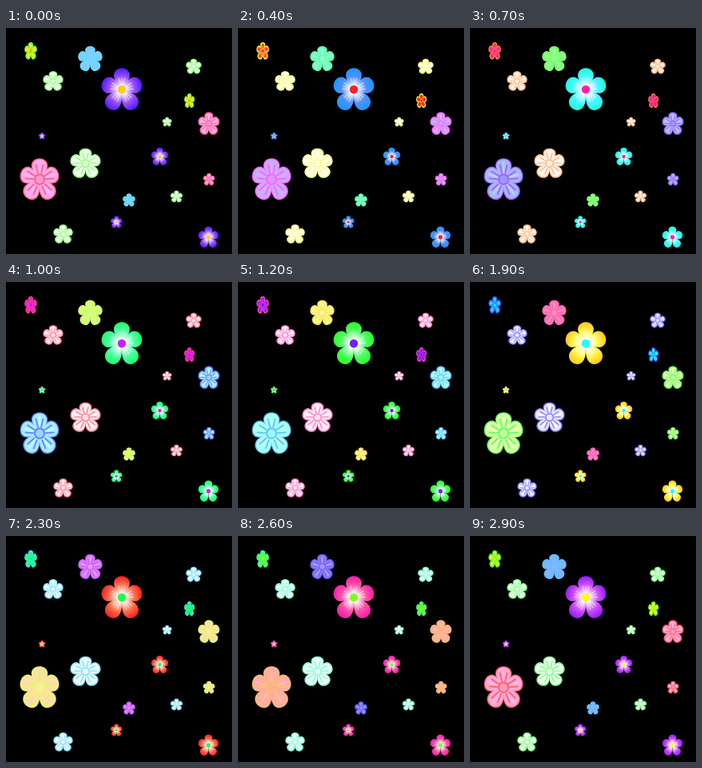
Recreate the animation shown at these times as an HTML page with a canvas. Size 283 by 283 pixels, loop 3000 ms.

```html
<!DOCTYPE html>
<html lang="en">
<head>
<meta charset="utf-8">
<title>Colour-cycling flowers</title>
<style>
html, body { margin: 0; width: 100%; height: 100%; overflow: hidden; background: #000; }
canvas { display: block; width: 283px; height: 283px; }
</style>
</head>
<body>
<canvas id="stage" width="283" height="283"></canvas>
<script>
const ctx = document.getElementById('stage').getContext('2d');
const STEP = 100, STEPS = 30;

const hsl = (h, s, l) => `hsl(${((h % 360) + 360) % 360} ${s}% ${l}%)`;

// Spots are "centre x, centre y, width"; tall is height over width.
const kinds = [
  {
    tall: 1.03, spots: '145,77,52 192.5,161,22 138.2,243,15 253.5,262,26 45,135.2,8.5',
    draw: (radius, turn, phase) => violet(256 + turn + 22 * Math.sin(Math.PI * phase ** 2.5), 46 + turn)
  },
  {
    tall: 1.05, spots: '42,189.5,50 254,119.7,27.5 254.2,189.5,15',
    draw: (radius, turn) => striped(radius, hsl(348 + turn, 100, 69), hsl(314 + turn, 100, 83),
      hsl(300 + turn, 100, 86), hsl(325 + turn, 100, 80))
  },
  {
    tall: .96, spots: '99.5,169.5,39 59,66.5,26 235,48,20 201.7,117.5,12 213.5,211,15.5 71.5,258,25',
    draw: (radius, turn) => striped(radius, hsl(110 + turn, 100, 74), hsl(110 + turn, 100, 95),
      '#fff', hsl(110 + turn, 100, 96))
  },
  {
    tall: 1.02, spots: '105.5,38.5,31 154,215.5,16',
    draw: (radius, turn) => striped(radius, hsl(190 + turn, 100, 69), hsl(202 + turn, 100, 74),
      hsl(225 + turn, 100, 82), hsl(210 + turn, 100, 78))
  },
  {
    tall: 1.37, spots: '31,28.7,16 229.7,91,13.5',
    draw: (radius, turn) => striped(radius, hsl(104 + turn, 100, 62), hsl(52 + turn, 100, 55),
      hsl(62 + turn, 100, 60), hsl(40 + turn, 100, 55))
  }
].map(kind => ({ ...kind, spots: kind.spots.split(' ').map(s => s.split(',').map(Number)) }));

function petal(w, colour) {
  ctx.beginPath();
  ctx.moveTo(0, 0);
  for (const [side, from, to] of [[-1, 0, -1], [1, -1, 0]]) {
    const x = side * w;
    if (from === 0) {
      ctx.bezierCurveTo(x * .35, -.2, x * 1.04, -.4, x, -.7);
      ctx.bezierCurveTo(x * .92, -.91, x * .45, -1, 0, to);
    } else {
      ctx.bezierCurveTo(x * .45, from, x * .92, -.91, x, -.7);
      ctx.bezierCurveTo(x * 1.04, -.4, x * .35, -.2, 0, to);
    }
  }
  ctx.fillStyle = colour;
  ctx.fill();
}

function disc(r, colour) {
  ctx.beginPath();
  ctx.arc(0, 0, r, 0, Math.PI * 2);
  ctx.fillStyle = colour;
  ctx.fill();
}

// A pointed streak fanning out along the petal
function rays(count, spread, inner, outer, width, colour) {
  ctx.strokeStyle = colour;
  ctx.lineWidth = width;
  for (let i = 0; i < count; i++) {
    const lean = count > 1 ? spread * (2 * i / (count - 1) - 1) : 0;
    ctx.beginPath();
    ctx.moveTo(lean * inner, -inner);
    ctx.lineTo(lean * outer, -outer);
    ctx.stroke();
  }
}

function eachPetal(draw) {
  for (let i = 0; i < 5; i++) {
    ctx.save();
    ctx.rotate(i * Math.PI * 2 / 5);
    ctx.scale(1, i === 2 || i === 3 ? 1.1 : 1);
    draw();
    ctx.restore();
  }
}

function violet(hue, heart) {
  const shade = ctx.createRadialGradient(0, 0, .15, 0, 0, 1.05);
  shade.addColorStop(0, '#fff');
  shade.addColorStop(.2, hsl(hue + 10, 100, 86));
  shade.addColorStop(.5, hsl(hue + 10, 100, 66));
  shade.addColorStop(1, hsl(hue - 3, 100, 53));
  eachPetal(() => {
    petal(.38, shade);
    rays(3, .28, .15, .55, .04, 'rgba(255,255,255,.6)');
  });
  disc(.2, hsl(heart, 100, 56));
}

function striped(radius, line, fill, light, ring) {
  const edge = Math.min(.15, 1.3 / radius);
  eachPetal(() => petal(.41, line));
  eachPetal(() => {
    ctx.scale(1, 1 - edge);
    petal(.41 - edge, fill);
    if (radius < 7) return;
    rays(1, 0, .3, .85, .1, light);
    rays(2, .25, .3, .75, .07, line);
  });
  disc(.28, line);
  disc(.2, ring);
}

function render(step) {
  ctx.fillStyle = '#000';
  ctx.fillRect(0, 0, 283, 283);
  for (const { spots, tall, draw } of kinds) {
    for (const [x, y, width] of spots) {
      ctx.save();
      ctx.translate(x, y);
      ctx.scale(width / 2, width / 2 * tall);
      draw(width / 2, -360 * step / STEPS, step / STEPS);
      ctx.restore();
    }
  }
}

const start = performance.now();
function tick() {
  render(Math.floor((performance.now() - start) / STEP) % STEPS);
  requestAnimationFrame(tick);
}
tick();
</script>
</body>
</html>
```
